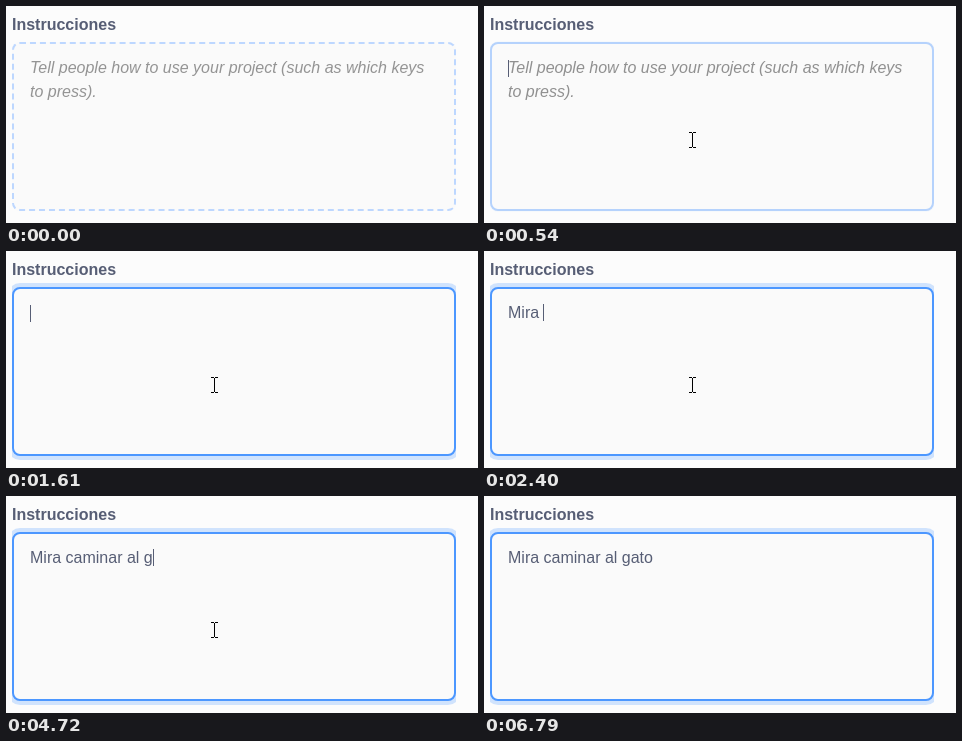
Animation, 472 px wide and 217 px high, one loop 7.12 s. Source, as an HTML page:

```html
<!DOCTYPE html>
<html lang="es">
<head>
<meta charset="utf-8">
<title>Instrucciones</title>
<style>
html, body { margin: 0; width: 100%; height: 100%; overflow: hidden; background: #fcfcfc; }
body { position: relative; font: 16px/24px "Liberation Sans", Arial, sans-serif; color: #575e75; }
body * { position: absolute; box-sizing: border-box; white-space: pre; }
h1 { left: 6px; top: 7px; margin: 0; font-size: 16px; line-height: 24px; }
#clip { left: 6px; top: 0; width: 444px; height: 217px; overflow: hidden; }
#field { left: 0; top: 36px; width: 444px; height: 169px; border: 2px dashed; border-radius: 8px; background: #fafafa; }
#hint, #typed { left: 24px; top: 50px; }
#hint { font-style: italic; }
#caret { width: 1px; height: 17px; background: #575e75; }
#mouse { width: 7px; height: 16px; fill: none; stroke: #000; shape-rendering: crispEdges; }
</style>
</head>
<body>
<h1>Instrucciones</h1>
<div id="clip"><div id="field"></div></div>
<div id="hint">Tell people how to use your project (such as which keys
to press).</div>
<div id="typed"></div>
<div id="caret"></div>
<svg id="mouse" viewBox="0 0 7 16"><path d="M0 .5H3M4 .5H7M3.5 1V15M0 15.5H3M4 15.5H7"/></svg>
<script>
const LOOP = 7120;
const TEXT = 'Mira caminar al gato';
const FOCUS = 540;

// Time at which each character of TEXT appears
const keys = [1740, 2000, 2130, 2330, 2400, 2800, 2930, 3130, 3260, 3460,
  3530, 3660, 3860, 3990, 4190, 4320, 4720, 4780, 5050, 5180];

// [time, value] steps, each held until the next
const hintFade = [[0, 0], [70, 0.6], [150, 1]];
const focusFade = [[0, 0], [FOCUS, 0.2], [610, 0.55], [680, 0.85], [750, 1]];
const caretOn = [[0, 0], [FOCUS, 1], [1080, 0], [1610, 1], [5710, 0], [6240, 1], [6790, 0]];
const mousePath = [
  [0, null], [70, [360, 212]], [150, [310, 187]], [200, [260, 160]], [270, [222, 140]], [340, [208, 133]],
  [5970, [212, 134]], [6050, [228, 140]], [6110, [250, 150]], [6180, [285, 165]],
  [6240, [325, 182]], [6310, [362, 200]], [6380, [392, 213]], [6460, null]
];

const [field, hint, typed, caret, mouse] =
  ['field', 'hint', 'typed', 'caret', 'mouse'].map(id => document.getElementById(id));

const at = (steps, t) => steps.filter(s => s[0] <= t).pop()[1];
const mix = (a, b, k) => `rgb(${a.map((v, i) => Math.round(v + (b[i] - v) * k))})`;
const show = (el, on) => { el.style.visibility = on ? 'visible' : 'hidden'; };
const place = (el, x, y) => { el.style.left = x + 'px'; el.style.top = y + 'px'; };

function drawField(t) {
  const k = at(focusFade, t), h = at(hintFade, t), focused = t >= FOCUS;
  field.style.borderStyle = focused ? 'solid' : 'dashed';
  field.style.borderColor = focused
    ? mix([207, 225, 251], [76, 151, 255], k)
    : mix([189, 215, 255], [207, 225, 251], h);
  field.style.boxShadow = `0 0 0 ${4 * k}px rgba(76, 151, 255, ${0.25 * k})`;
  hint.style.color = focused
    ? mix([117, 117, 117], [250, 250, 250], k)
    : mix([148, 148, 148], [117, 117, 117], h);
  show(hint, k < 1);
}

function drawText(t) {
  const text = TEXT.slice(0, keys.filter(k => k <= t).length);
  if (typed.textContent !== text) typed.textContent = text;
  const width = typed.getBoundingClientRect().width;
  const x = text.endsWith(' ') ? Math.floor(width) : Math.round(width);
  place(caret, 24 + x, text ? 53 : 54);
  show(caret, at(caretOn, t));
}

function drawMouse(t) {
  const p = at(mousePath, t);
  show(mouse, p);
  if (p) place(mouse, p[0] - 3, p[1] - 7);
}

let start;
function frame(now) {
  start ??= now;
  const t = (now - start) % LOOP;
  drawField(t);
  drawText(t);
  drawMouse(t);
  requestAnimationFrame(frame);
}
requestAnimationFrame(frame);
</script>
</body>
</html>
```
